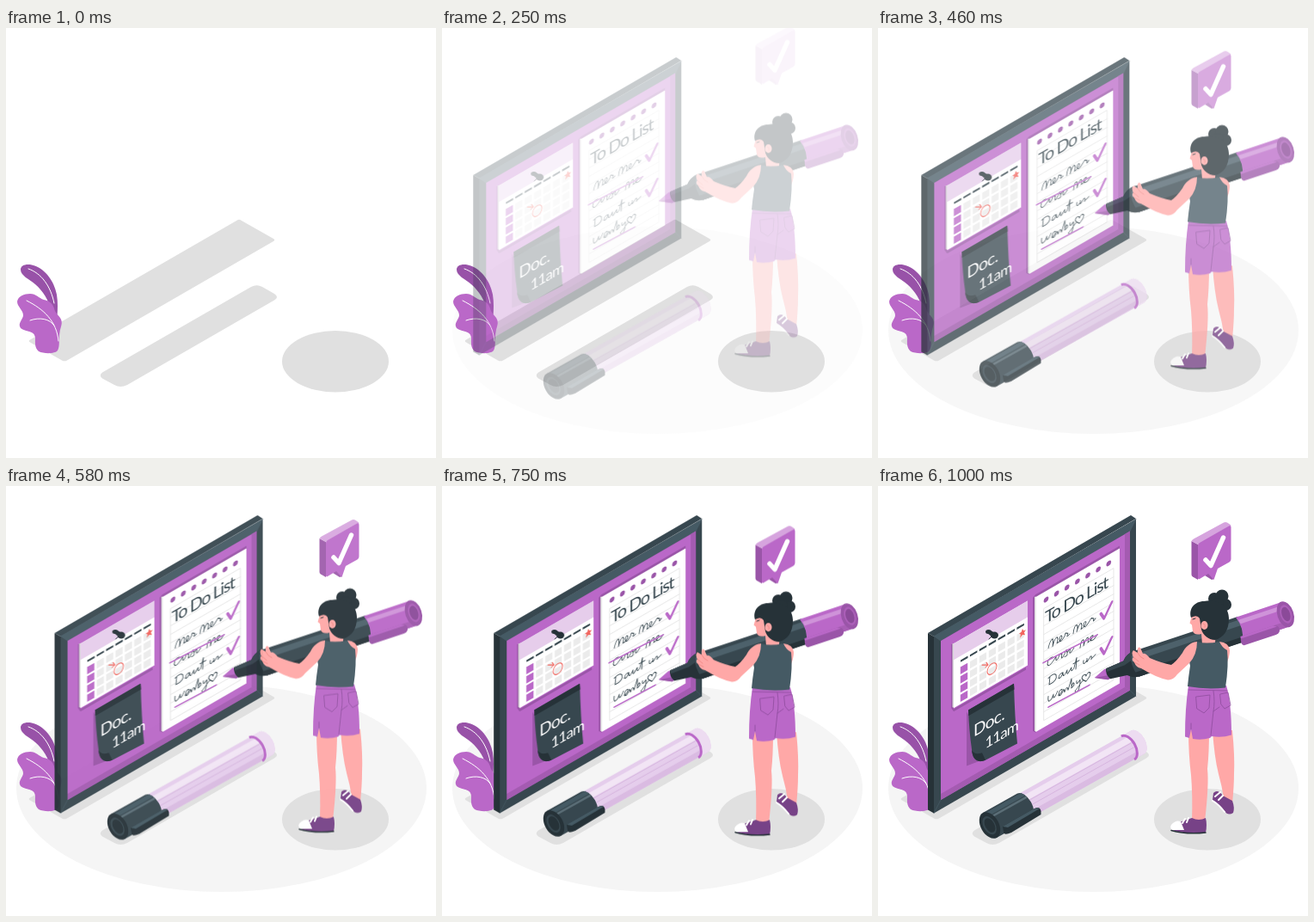
Recreate the animation shown at these times as an HTML page. Size 500 by 500 pixels, loop 1.04 s.

```html
<!DOCTYPE html>
<html lang="en">
<head>
<meta charset="utf-8">
<title>To do list</title>
<style>
  html, body { margin: 0; width: 100%; height: 100%; overflow: hidden; background: #fff; }
  svg { display: block; width: 100vw; height: 100vh; }
  text { font-family: Lato, "Open Sans", sans-serif; }

  .enter { animation: enter 1040ms infinite; }
  .board { --x: -30px; }
  .marker { --y: 30px; }
  .woman { --y: -30px; }
  .bubble { --y: -60px; }

  @keyframes enter {
    0%, 11.4% {
      opacity: 0;
      transform: translate(var(--x, 0px), var(--y, 0px));
      animation-timing-function: cubic-bezier(.42, .72, .5, 1.29);
    }
    96.15%, 100% { opacity: 1; transform: translate(0px, 0px); }
  }

  /* the bubble fades in twice, so it lags behind the rest */
  .fade { --x: 0px; --y: 0px; }

  .line { fill: none; stroke-linecap: round; stroke-linejoin: round; }
  .purple { fill: #ba68c8; }
  .plum { fill: #9a55a8; }
  .slate { fill: #37474f; }
  .steel { fill: #455a64; }
  .ink { fill: #263238; }
  .skin { fill: #ffa8a7; }
  .shadow { fill: #e0e0e0; }
</style>
</head>
<body>
<svg viewBox="0 0 500 500">
  <ellipse class="enter" cx="250.5" cy="351.500" rx="238.500" ry="120.500" fill="#f5f5f5"/>

  <g class="shadow">
    <path d="M268.500 223.700Q271 222 273.500 223.700L311 245Q313.500 246.500 311 248L71 386.500Q68 388.200 65 386.500L28 365.500Q25.500 364 28 362.500Z"/>
    <path d="M285 301Q291.500 297.500 298 301L312 309Q318 313 312 316.500L141 415Q133 419 126 415L112 407.500Q107.500 404 112 400.500Z"/>
    <ellipse cx="383" cy="387.700" rx="62" ry="35.700"/>
  </g>

  <g class="plant">
    <path fill="#9852a8" d="M17 281C17 276 23 274 30 275.500C45 279 56 294 59 310C60.500 319 60 328 59.500 335L52 330C50 316 43 306 34 298C27 292 17 288 17 281Z"/>
    <path class="purple" d="M13 318C14 312 21 309 28 309C35 309 38 314 44 316C50 317 54 320 56 326C57 331 60 333 63 337C67 343 63 348 62.500 354C61 362 63 370 60 375C57 379 44 379 38 376C33 372 34 365 34 360C33 351 23 354 17 349C13 343 20 339 20 334C20 328 13 324 13 318Z"/>
    <g class="line" stroke="#fff" stroke-width="1">
      <path d="M26 280C41 285 52 300 56 320"/>
      <path d="M24 317C44 327 59 341 61 364M28 340C39 336 51 338 56 346"/>
    </g>
  </g>

  <g class="enter board">
    <path class="ink" d="M58 171L65 175V380.400L58 376.400Z"/>
    <path class="slate" d="M58 171L294 34L300 38L65 175Z"/>
    <g transform="matrix(1 -.579 0 1 65 174.600)">
      <path class="slate" d="M0 0H235V206H0Z"/>
      <path class="steel" d="M0 0H235L228 10H8Z"/>
      <path class="line" stroke="#4d616b" stroke-width=".5" d="M0 0L8 10M235 0L228 10M0 206L8 195M235 206L228 195"/>
      <path class="purple" d="M8 10H228V195H8Z"/>
      <path fill="#a45bb1" d="M228 10V195L222 188V10Z"/>
      <path fill="#a45bb1" d="M8 195H228L222 188H8Z"/>

      <!-- calendar -->
      <path class="plum" d="M20 21L23 22V98L107 98V101H23L20 95Z"/>
      <path fill="#d7d7d7" d="M21.500 21L24 22V97L21.500 95Z"/>
      <path fill="#fff" d="M23 22H109V97H23Z"/>
      <path fill="#e6cdeb" d="M23 22H109V41H23Z"/>
      <path fill="none" stroke="#37474f" stroke-width="2.400" stroke-dasharray="8.500 2.400" d="M31 47H107"/>
      <g fill="none" stroke="#ebebeb" stroke-width="8" stroke-dasharray="8.200 2.700">
        <path d="M42 58H105M42 68.700H105M42 79.400H105M42 90H105"/>
      </g>
      <path fill="none" stroke="#ba68c8" stroke-width="8.400" stroke-dasharray="8.400 2.300" d="M35 53.800V94.300"/>
      <g class="line" stroke="#f2665f" stroke-width="1">
        <ellipse cx="67.500" cy="77" rx="5.500" ry="6"/>
        <path d="M56 66L63 70M60 71L63 70L61 66"/>
      </g>
      <path fill="#f2665f" d="M103 51L104.300 54L107 54.500L105 56.500L106 60L103 58L100 60L101 56.500L99 54.500L101.700 54Z"/>

      <!-- sticky note -->
      <path class="plum" d="M38 110V173L59 177L62 167Z"/>
      <path class="slate" d="M40 109H93Q94 150 97 181L60 179Q45 176 44 157Q41 134 40 109Z"/>
      <path class="ink" d="M40 109H93L93.500 116H40.300ZM44 158Q47 166 56 168L60 179Q46 176 44 158Z"/>
      <g fill="#fff">
        <text x="46" y="144" font-size="19" letter-spacing="-.6">Doc.</text>
        <text x="59.500" y="165.500" font-size="17" letter-spacing="-1">11am</text>
      </g>

      <!-- to do sheet -->
      <path class="plum" d="M115 22L118 20H216V24H119V181L115 177Z"/>
      <path fill="#dcdcdc" d="M117 22L119 23V180L117 178Z"/>
      <path fill="#fff" d="M118.500 23H216V180H118.500Z"/>
      <path class="line" stroke="#e3e3e3" stroke-width=".7" d="M128 42H209V172H128ZM128 52H209M128 62H209M128 72H209M128 82H209M128 92H209M128 102H209M128 112H209M128 122H209M128 132H209M128 142H209M128 152H209M128 162H209"/>
      <path class="line" stroke="#9a55a8" stroke-width="5.800" stroke-dasharray="0 12.130" d="M130.500 33H204"/>
      <text class="slate" x="129" y="60.500" font-size="19.500" letter-spacing="-1.300">To Do List</text>
      <g class="line" stroke="#37474f" stroke-width=".9">
        <path d="M133 91Q135 83 138 83Q139 86 138 92Q141 83 143 84Q145 86 143 91Q148 91 149 87Q148 83 146 87Q146 95 152 88L153 85L156 87Q153 92 158 89M162 91Q163 82 166 83Q168 86 166 91Q169 83 171 84Q173 87 171 91Q177 90 177 86Q175 83 174 88Q175 94 181 87L183 85L186 87Q184 92 188 88"/>
        <path d="M138 104Q132 103 132 109Q133 114 139 109L142 106V110Q144 112 146 106L149 107Q147 114 151 110L154 105Q157 114 152 112M155 109Q160 104 158 109Q157 114 163 108M170 112Q171 103 174 105Q175 108 174 112Q177 104 179 105Q180 108 179 111Q185 110 185 106Q181 105 182 110Q185 114 190 108"/>
        <path d="M135 125L134 134Q144 135 142 127Q139 123 133 126M150 129Q145 128 145 133Q148 135 150 129Q150 136 153 132L155 129Q154 137 158 131L160 129Q159 136 163 131L166 121L165 134M162 126H169M174 129Q173 136 178 131V129L178 133L181 130Q184 127 183 133M184 132L188 130"/>
        <path d="M133 147Q132 156 137 152L139 148Q138 157 144 147M145 153Q150 151 149 148Q145 147 145 153Q148 156 151 149L152 153Q155 146 156 153L160 142V153Q165 151 162 148L160 151M166 148Q165 154 170 149V153Q168 165 164 159Q168 156 173 152M177 155Q169 148 174 146Q177 146 177 149Q179 144 182 148Q182 152 177 155Z"/>
      </g>
      <g class="line" stroke="#ba68c8">
        <path stroke-width="1.700" d="M127 104.500Q158 106 190 108.500M133 159.500L181 161.500"/>
        <path stroke-width="3" d="M194 86L198 94L207 80M194 126.500L198 135L207 121"/>
      </g>
    </g>
    <!-- pin -->
    <g class="ink">
      <ellipse cx="128.500" cy="169.500" rx="3.500" ry="2.500"/>
      <path d="M127 171L131 168L136 171L132 175Z"/>
      <ellipse cx="135.500" cy="173.500" rx="4.500" ry="4"/>
      <path class="line" stroke="#263238" stroke-width="1" d="M133 174L129 178"/>
    </g>
  </g>

  <g class="enter marker">
    <g transform="translate(130 394.500) rotate(-29.300)">
      <path fill="#e5cdec" d="M45 -15.500H197A9 15.500 0 0 1 197 15.500H45Z"/>
      <path fill="#f2e5f5" d="M45 -11H204V-4H45Z"/>
      <path fill="#dabbe2" d="M45 9H202L197 15.500H45Z"/>
      <path class="line" stroke="#d2afdc" stroke-width=".7" d="M45 -3H190M45 3H190"/>
      <path fill="#eddcf1" d="M184 -15.500H197A9 15.500 0 0 1 197 15.500H184A9 15.500 0 0 0 184 -15.500Z"/>
      <path fill="none" stroke="#ba68c8" stroke-width="3" d="M184 -15.500A9 15.500 0 0 1 184 15.500"/>
      <path class="slate" d="M0 -16.500H46A9 16.500 0 0 1 46 16.500H0Z"/>
      <path class="steel" d="M0 -15H50L53 -10H0Z"/>
      <path fill="#5b6e77" d="M0 -9H53.500V-6.500H0Z"/>
      <ellipse class="ink" cx="0" cy="0" rx="10.500" ry="16.500"/>
      <ellipse class="slate" cx="-.5" cy="0" rx="7" ry="11.500"/>
      <ellipse class="ink" cx="0" cy="0" rx="5.300" ry="9"/>
    </g>
    <path class="ink" d="M145 396L180 376Q188 371 189.500 378V382L155 403Q146 407 146 402Z"/>
    <path class="steel" d="M145 396L180 376Q186 373 188 375L151 397Z"/>
  </g>

  <g class="enter woman">
    <!-- held pen -->
    <g transform="translate(285 212) rotate(-18.400)">
      <path class="purple" d="M-35 0L-21 -6L-13 -5V6L-21 7Z"/>
      <path class="plum" d="M-35 0L-20 2L-14 6L-21 7Z"/>
      <path class="ink" d="M-19 -6Q-22 0 -18 7L2 9Q8 15 16 15H22V-15H16Q8 -14 3 -8Z"/>
      <path class="slate" d="M-19 -6L3 -8Q8 -14 16 -15L20 -8L3 -3L-19 -2Z"/>
      <path class="slate" d="M14 -15H146V15H14Q8 0 14 -15Z"/>
      <path fill="#4d616b" d="M14 -11H146V-4H12Z"/>
      <path class="ink" d="M12 9H146V15H14Z"/>
      <path class="purple" d="M143 -15H199V15H141Q149 0 143 -15Z"/>
      <path fill="#cf93d9" d="M145 -11H196V-6H146Z"/>
      <path fill="#a85eb5" d="M145 8H196V15H141Z"/>
      <ellipse class="plum" cx="199" cy="0" rx="9.500" ry="15.500"/>
      <ellipse cx="199.500" cy="0" rx="6.500" ry="11" fill="#ad60ba"/>
      <ellipse cx="199.500" cy="0" rx="4.800" ry="8.500" fill="#8b4a99"/>
      <path class="plum" d="M141 9H179Q187 8 187 13Q187 19 181 19H142Q138 18 141 9Z"/>
      <path class="purple" d="M141 8H181L185 10.500H141Z"/>
    </g>

    <!-- legs -->
    <path class="skin" d="M389 284L412 284Q415 315 414 334Q414 349 412 369L402 363Q400 349 396 335Q391 315 389 284Z"/>
    <path class="skin" d="M361 284H385Q385 311 383 329Q385 347 380 390H365Q366 360 364 336Q361 312 361 284Z"/>

    <!-- shoes -->
    <path fill="#774287" d="M390 357Q395 352 401 360L412 366Q415 374 413 380Q407 384 403 378Q396 369 389 365Z"/>
    <path class="line" stroke="#fff" stroke-width="2" d="M392 361L398 356M396 365L401 360M389 366Q396 370 403 379"/>
    <path fill="#774287" d="M350 391L365 386Q373 390 381 386Q383 394 381 403Q361 406 342 400Z"/>
    <path fill="#fff" d="M341 394Q346 388 352 390L356 400L342 400Q339 397 341 394Z"/>
    <path class="line" stroke="#fff" stroke-width="2" d="M354 392L357 387M359 391L361 386"/>
    <path class="line" stroke="#263238" stroke-width="1.500" d="M341 400.500Q359 405.500 381 403"/>

    <!-- shorts -->
    <path class="purple" d="M361 232H405Q411 252 411 289.500Q400 293 388 291L386 293Q376 296 366 294L364 283L362 293L357 291.500Q357 258 361 232Z"/>
    <g class="line" stroke="#8f4d9d" stroke-width=".8">
      <path d="M361 237L406 238M390 238Q392 251 390 262L387 290M370 245L386 243L385 258L379 264L371 259ZM398 242L407 240L410 255L403 259L399 254ZM390 262L397 257M364 283V276"/>
    </g>

    <!-- far arm, neck and face -->
    <path class="skin" d="M397 181Q408 182 409 191Q409 200 404 208L397 206Z"/>
    <path class="skin" d="M379 147Q368 142 365 151L362.500 159.500L365 161.500L366 169Q368 174 376 172L377 184Q384 190 392 182L394 158Z"/>

    <!-- vest -->
    <path class="steel" d="M371 181Q381 184 397 181Q400 188 406 191Q408 208 404 234.500Q382 237 360 233Q361 222 363 209Q359 197 366 189Z"/>

    <!-- near arm and hand -->
    <path class="skin" d="M371 181C362 182 357 188 354 194Q347 204 341 208Q330 206 316 200Q311 194 308 195L305 188Q301 186 302 194L297 191Q294 194 297 199Q294 202 298 205Q300 211 306 212Q324 223 337 225.500Q343 226 348 219L362 206Q371 196 371 181Z"/>
    <path class="line" stroke="#ee8582" stroke-width=".8" d="M302 194Q304 199 309 201M297 199L303 204M298 205L304 208"/>

    <!-- hair -->
    <g class="ink">
      <circle cx="391" cy="131" r="7"/>
      <circle cx="400" cy="128" r="7.500"/>
      <circle cx="404" cy="138" r="7"/>
      <circle cx="395" cy="137" r="7"/>
      <path d="M364 153C361 143 368 134 379 134C397 130 408 141 408 154C408 168 402 176 392 179C384 179 378 173 376 167L374 154Q371 149 364 153Z"/>
    </g>
    <ellipse class="skin" cx="379.500" cy="162" rx="4" ry="5"/>
    <path class="line" stroke="#263238" stroke-width="1" d="M366 155L369 154"/>
    <path class="line" stroke="#ee8582" stroke-width=".8" d="M378 160Q381 160 380 164"/>
  </g>

  <g class="enter bubble"><g class="enter fade">
    <path class="plum" d="M364.500 64L372 68V109L366 105.500Q364.500 104.500 364.500 103Z"/>
    <path fill="#d6a4de" d="M364.500 64Q365 62.500 367 61.500L402 42.500Q404 41.500 406 42.500L410.500 45.500L372 68Z"/>
    <path class="plum" d="M380 104L388 109L391 108L385 100Z"/>
    <path class="purple" d="M372 69Q372 67 374 66L408 46.500Q410.500 45 410.500 48V85Q410.500 87 408.500 88.500L395 96L390.500 109L384 102L374 108Q372 109 372 107Z"/>
    <path class="line" stroke="#fff" stroke-width="5.500" d="M381 86L387 92.500L401.500 60"/>
  </g></g>
</svg>
</body>
</html>
```
